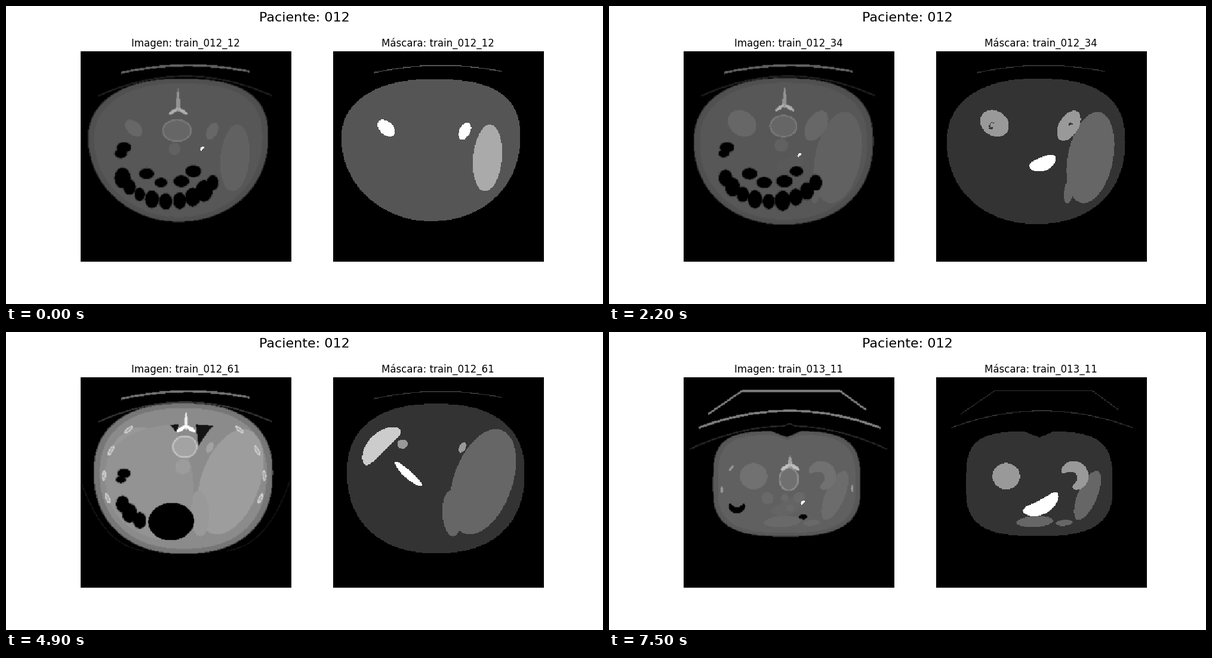
Recreate the animation shown at these times as a matplotlib script. Size 1000x500 px, loop 7600 ms.

```python
import numpy as np
import matplotlib.pyplot as plt
from matplotlib.animation import FuncAnimation

N = 256                                 # cells along a panel side
CELL = N / 352.27                       # cells per stage pixel
ORIGIN = np.array([125, 76.4])
FIRST, SLICES, FRAMES = 12, 64, 76
TURN = np.linspace(0, 2 * np.pi, 120, endpoint=False)

# body: left, right, top, bottom, waist height, roundness of the four quarters
BODY = {12: [(138.5, 437.5, 123, 361, 222, 2.2, 2.7, 2.0, 2.1),
             (151, 447, 120, 374, 240, 2.4, 2.3, 2.3, 2.4)],
        13: [(175, 420, 167, 342, 260, 3.8, 3.5, 3.0, 2.8)] * 2}

# bent ellipses by slice: x, y, half length, half width, heading, bend
PARTS = {
    12: {
        "liver": {12: (383, 255, 56, 24, 95, 0), 44: (383, 254, 87, 44, 104, 0),
                  68: (372, 250, 94, 51, 112, 0), 75: (364, 251, 89, 43, 117, 0)},
        "lobe": {44: (347, 310, 30, 11, 100, 0), 68: (314, 302, 42, 18, 82, 0),
                 75: (309, 296, 36, 18, 75, 0)},
        "kidney_l": {12: (214, 205, 17, 11, 42, 0), 25: (215, 201, 26, 21, 50, 0),
                     55: (241, 188, 24, 20, 0, 0)},
        "kidney_r": {12: (345, 210, 15, 9, 117, 0), 25: (349, 204, 29, 17, 122, 0),
                     55: (341, 194, 25, 14, 120, 0)},
        "spleen": {44: (192, 183, 10, 5, -38, 0), 55: (195, 190, 34, 13, -48, 0.2),
                   68: (208, 183, 53, 18, -40, 0.9), 75: (214, 187, 46, 19, -28, 0.6)},
        "pancreas": {25: (302, 257, 16, 12, 0, 0), 44: (306, 274, 32, 11, -45, -1.2),
                     55: (250, 239, 59, 13, 42, -0.1)},
        "stomach": {55: (282, 318, 40, 29, -8, 0), 68: (270, 318, 36, 34, 0, 0),
                    75: (278, 331, 18, 16, 0, 0)}},
    13: {
        "liver": {11: (378, 274, 44, 16, 113, 0)},
        "lobe": {11: (290, 318, 31, 9, -3, 0)},
        "tip": {11: (339, 320, 14, 5, -5, 0)},
        "kidney_l": {11: (242, 242, 23, 22, 0, 0)},
        "kidney_r": {11: (367, 233, 38, 10, 55, 2.2)},
        "pancreas": {11: (303, 293, 34, 12, -28, -0.6)}}}

# mask value and relative brightness in the scan
ORGANS = {"liver": (2, 1.13), "lobe": (2, 1.1), "tip": (2, 1.1),
          "kidney_l": (3, 1.18), "kidney_r": (3, 1.18),
          "spleen": (4, 1.1), "pancreas": (5, 1.04)}
# slices a part needs to grow in, and to shrink away
FADE = {"kidney_l": (30, 7), "kidney_r": (30, 7), "spleen": (7, 99),
        "lobe": (20, 99), "pancreas": (8, 8), "stomach": (7, 99)}


# ---------- shapes, in stage pixels ----------
def fill(x, y):
    """Even-odd scanline mask of a polygon."""
    x, y = (x - ORIGIN[0]) * CELL, (y - ORIGIN[1]) * CELL
    x2, y2 = np.roll(x, -1), np.roll(y, -1)
    rows = np.arange(N) + 0.5
    e, r = np.nonzero((y[:, None] <= rows) != (y2[:, None] <= rows))
    cut = x[e] + (rows[r] - y[e]) * (x2[e] - x[e]) / (y2[e] - y[e])
    flips = np.zeros((N, N + 1), int)
    np.add.at(flips, (r, np.clip(np.ceil(cut - 0.5), 0, N).astype(int)), 1)
    return np.cumsum(flips, axis=1)[:, :N] % 2 == 1


def bean(x, y, a, b, heading=0, bend=0, taper=0):
    """Ellipse whose long axis is rolled into an arc."""
    s, k, h = np.cos(TURN), bend + 1e-6, np.radians(heading)
    w = b * np.sin(TURN) * (1 + taper * s)
    u = a * np.sin(k * s) / k - w * np.sin(k * s)
    v = a * (1 - np.cos(k * s)) / k + w * np.cos(k * s)
    return fill(x + u * np.cos(h) - v * np.sin(h), y + u * np.sin(h) + v * np.cos(h))


def squircle(left, right, top, bottom, waist, *rounds):
    c, s = np.cos(TURN), np.sin(TURN)
    tl, tr, bl, br = rounds
    p = 2 / np.where(s < 0, np.where(c < 0, tl, tr), np.where(c < 0, bl, br))
    x = (left + right) / 2 + (right - left) / 2 * np.sign(c) * np.abs(c)**p
    y = waist + np.where(s < 0, waist - top, bottom - waist) * np.sign(s) * np.abs(s)**p
    return x, y


def stroke(width, x, y):
    x, y = np.asarray(x, float), np.asarray(y, float)
    dx, dy = np.gradient(x), np.gradient(y)
    k = width / 2 / np.hypot(dx, dy)
    return fill(np.r_[x - dy * k, (x + dy * k)[::-1]],
                np.r_[y + dx * k, (y - dx * k)[::-1]])


def arch(width, x0, x1, top, mid, drop):
    """Shallow parabola falling by drop at 110 px from its middle."""
    x = np.linspace(x0, x1, 60)
    return stroke(width, x, top + drop * ((x - mid) / 110)**2)


# ---------- anatomy ----------
def body(patient, s, scale=1.0):
    u = (s - FIRST) / (SLICES - 1)
    first, last = np.array(BODY[patient])
    x, y = squircle(*(first + (last - first) * u))
    if patient == 13:
        y = y + np.where(y < 250, 10 * np.exp(-((x - 298) / 12)**2), 0)
    cx, cy = (x.min() + x.max()) / 2, (y.min() + y.max()) / 2
    return fill(cx + (x - cx) * scale, cy + (y - cy) * scale)


def pose(patient, name, s):
    """Place and size of a part at a slice, or None while it is absent."""
    keys = PARTS[patient].get(name)
    if not keys:
        return None
    at = list(keys)
    grow, shrink = FADE.get(name, (99, 99))
    left = 1 - max(0, (at[0] - s) / grow, (s - at[-1]) / shrink)
    if left <= 0:
        return None
    p = np.array([np.interp(s, at, column) for column in zip(*keys.values())])
    p[2:4] *= np.sqrt(left)
    return p


def couch(patient, width):
    if patient == 12:
        return arch(width, 192, 407, 100, 305, 12)
    m = arch(width, 150, 454, 132.5, 302, 15)
    for x, y in [((166, 223), (138, 99)), ((223, 386), (99, 99)), ((386, 430), (99, 131))]:
        m |= stroke(width * 0.8, x, y)
    return m


def paint_couch(img, patient, late):
    if patient == 12:
        img[arch(2.4, 155, 445, 118, 300, 19)] = 0.4
        img[couch(12, 3.6)] = 0.85 if late else 1.15
    else:
        x = np.linspace(135, 465, 80)
        wave = 158 + 39 * np.abs((x - 300) / 165)**2 - 4 * np.exp(-((x - 302) / 6)**2)
        img[stroke(2.2, x, wave)] = 0.45
        img[couch(13, 3.8)] = 1.35
    if late:
        for side in (-1, 1):
            x = 300 + side * np.linspace(70, 175, 40)
            img[stroke(1.6, x, 370 - 120 * (np.abs(x - 300) / 175)**4)] = 0.17


def paint_spine(img, patient, s):
    u = (s - FIRST) / (SLICES - 1)
    if patient == 12:
        x, y, rx, ry = 286 + 17 * u, 209 - 21 * u, 25 - 5 * u, 19
        tip, lamina, ring = 138 - 4 * u, 178 - 18 * u, 1.4
        img[bean(282 + 18 * u, 240 - 18 * u, 10 + 4 * u, 10 + 3 * u)] = 1.12
    else:
        x, y, rx, ry, tip, lamina, ring = 301, 247, 17, 20, 207, 228, 1.5
        for dx, dy, r in [(-7, 31, 6), (-36, 32, 10), (17, 31, 9), (2, 48, 6)]:
            img[bean(x + dx, y + dy, r, r)] = 1.1
    img[bean(x, y, rx, ry)] = ring
    img[bean(x, y, rx - 2.5, ry - 2.5)] = 1.17
    x += 2
    img[bean(x, (tip + lamina) / 2, (lamina - tip) / 2, 3, 90, 0, 0.5)] = 1.7
    for side in (-1, 1):
        img[bean(x + 8 * side, lamina - 1, 9, 3, 35 * side)] = 2.0


def paint_gas(img, patient, s):
    if patient == 13:
        img[bean(214, 299, 18, 5, 0, -1.5) | bean(325, 310, 7, 4)] = 0
        return
    # loops of bowel: an outer row along the belly wall and a short inner row
    rng = np.random.default_rng(5)
    rows = [(a, 1.0, 11, 14) for a in np.linspace(158, 30, 9)]
    rows += [(a, 0.52, 11, 8) for a in (150, 108, 62, 22)]
    rows += [(a, 1.0, 10, 7) for a in (196, 206)]
    for angle, reach, a, b in rows:
        t, size, phase = np.radians(angle), rng.uniform(0.85, 1.15), rng.uniform(0, 6)
        x, y = 273 + 84 * reach * np.cos(t), 265 + 63 * reach * np.sin(t)
        size *= 1 + 0.12 * np.sin(s / 5 + phase)
        size *= np.clip(((56 if x > 235 else 74) - s) / 9, 0, 1)
        if size > 0:
            img[bean(x, y, a * size + 1.5, b * size + 1.5)] *= 0.8
            img[bean(x, y, a * size, b * size)] = 0
    air = pose(12, "stomach", s)
    if air is not None:
        img[bean(*air)] = 0


def paint_chest(img, s):
    """Lungs are what the organs leave free inside the rib cage."""
    if s < 56:
        return
    full = np.interp(s, [58, 68, 75], [1.4, 1.12, 1])
    lump = bean(238, 245, 86 * full, 56 * full, 80)
    x, y, a, b, heading, bend = pose(12, "liver", s)
    liver = bean(x, y, a * 1.07 * full, b * 1.14 * full, heading, bend)
    middle = bean(295, 255, 135, 30, 95, 0, 0.4)
    cage = fill(*squircle(166, 436, 155, 352, 240, 2.3, 2.3, 2.3, 2.3))
    img[lump & cage] = 1.06
    img[cage & ~(lump | liver | middle)] = 0.14


def paint_ribs(img, patient, s):
    if patient == 13:
        for x, y, heading in [(189, 265, 90), (407, 262, 90), (205, 228, 125)]:
            img[bean(x, y, 6, 2, heading)] = 1.6
        return
    near = np.clip((s - 34) / 8, 0, 1)
    if near == 0:
        return
    for side in (-1, 1):
        for angle in (-42, -20, 2, 22):
            t = np.radians(angle - 0.7 * (s - 55))
            x, y = 298 + side * 134 * np.cos(t), 245 + 112 * np.sin(t)
            heading = np.degrees(np.arctan2(112 * np.cos(t), -side * 134 * np.sin(t)))
            img[bean(x, y, 9 * near, 3.4 * near, heading)] = 1.5
            img[bean(x, y, 6 * near, 1.3 * near, heading)] = 1.2


def scan(patient, s, organs):
    img = np.zeros((N, N))
    late = patient == 12 and s > 48
    paint_couch(img, patient, late)
    fat = 0.86 if late else 0.92
    for scale, tone in [(1.01, 0.6), (1, fat), (0.94, 1.0)]:
        img[body(patient, s, scale)] = tone
    for name, m in organs.items():
        img[m] = ORGANS[name][1]
    if patient == 12:
        paint_chest(img, s)
    paint_spine(img, patient, s)
    paint_gas(img, patient, s)
    paint_ribs(img, patient, s)
    around = sum(np.roll(img, d, axis) for axis in (0, 1) for d in (-1, 1))
    img = 0.6 * img + 0.1 * around
    if not late:
        x, y = (324, 286) if patient == 13 else (328 - 0.02 * (s - 12)**2, 239 + 0.023 * (s - 12)**2)
        img[bean(x, y, 4, 2, -50)] = 3
    if patient == 13:
        level = 96
    else:
        level = np.interp(s, [48, 49, 60, 68, 75], [87, 142, 140, 131, 147])
    return np.clip(img * level, 0, 255)


def labels(patient, s, organs):
    img = np.zeros((N, N))
    img[couch(patient, 1.5) | body(patient, s)] = 1
    for name, m in organs.items():
        img[m] = ORGANS[name][0]
    # hollow specks in the middle of the kidneys
    if patient == 12 and 18 <= s <= 50:
        rng = np.random.default_rng(s)
        for name in ("kidney_l", "kidney_r"):
            mid = (pose(12, name, s)[:2] - ORIGIN) * CELL
            x, y = (mid + np.cumsum(rng.integers(-1, 2, (26, 2)), axis=0) * 0.8).astype(int).T
            img[y, x] = 1
    return img * 255 / img.max()


fig, axes = plt.subplots(1, 2, figsize=(10, 5), dpi=100)
fig.suptitle("Paciente: 012", fontsize=16)
views = []
for ax in axes:
    ax.axis("off")
    views.append(ax.imshow(np.zeros((N, N)), cmap="gray", vmin=0, vmax=255,
                           interpolation="nearest"))


def update(i):
    patient, s = (12, FIRST + i) if i < SLICES else (13, i - SLICES)
    poses = {name: pose(patient, name, s) for name in ORGANS}
    organs = {name: bean(*p) for name, p in poses.items() if p is not None}
    for ax, view, head, draw in zip(axes, views, ("Imagen", "Máscara"), (scan, labels)):
        view.set_data(draw(patient, s, organs))
        ax.set_title(f"{head}: train_{patient:03d}_{s}")
    return views


anim = FuncAnimation(fig, update, frames=FRAMES, interval=100, repeat=True,
                     repeat_delay=0, blit=False)
plt.show()
```
